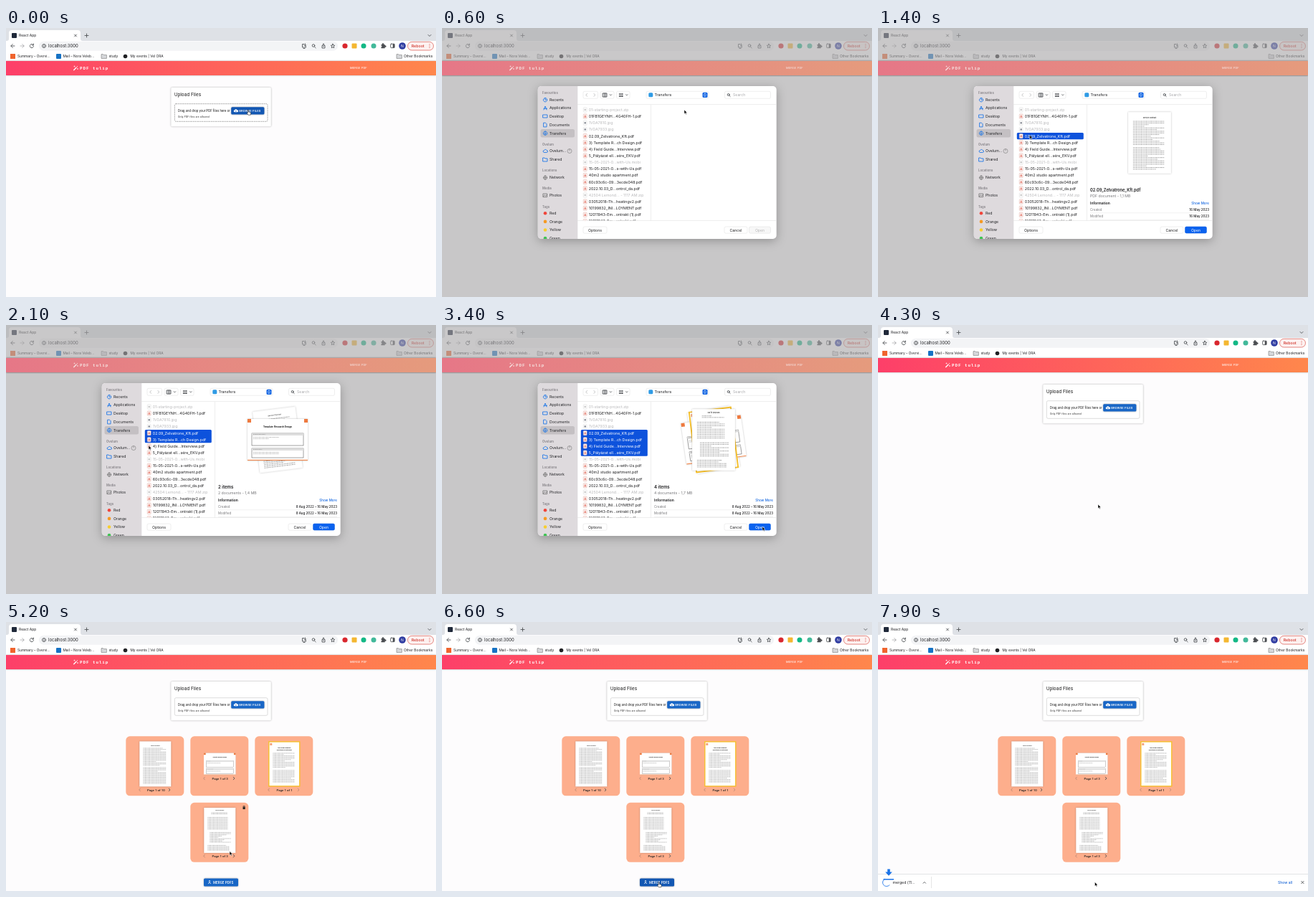
Animation, 600 px wide and 375 px high, one loop 8000 ms. Source, as an HTML page:

```html
<!DOCTYPE html>
<html lang="en">
<head>
<meta charset="utf-8">
<title>PDF merging demo</title>
<style>
html, body { margin: 0; width: 100%; height: 100%; overflow: hidden; background: #fdfcfd; }
svg { display: block; width: 100vw; height: 100vh; font-family: Inter, sans-serif; }
.page { font-family: Roboto, sans-serif; }
.line { fill: none; stroke: #4a4d51; stroke-width: .85; stroke-linecap: round; stroke-linejoin: round; }
.blue { stroke: #1673e8; }
.words { fill: none; stroke: #858585; stroke-width: .5; stroke-dasharray: 1.3 .4 .7 .3 1.9 .5; }
.paper { filter: drop-shadow(0 .4px .8px #0004); }
.raised { filter: drop-shadow(0 .7px 1px #0005); }
</style>
</head>
<body>
<svg id="stage" viewBox="0 0 600 375"></svg>
<script>
const LOOP = 8000;
const stage = document.getElementById('stage');

let seed = 7;
const rand = () => (seed = seed * 16807 % 2147483647) / 2147483647;
const text = (x, y, size, str, fill = '#202124', extra = '') =>
  `<text x="${x}" y="${y}" font-size="${size}" fill="${fill}" ${extra}>${str}</text>`;
const box = (x, y, w, h, fill, r = 0, extra = '') =>
  `<rect x="${x}" y="${y}" width="${w}" height="${h}" rx="${r}" fill="${fill}" ${extra}/>`;
const dot = (x, y, r, fill, extra = '') => `<circle cx="${x}" cy="${y}" r="${r}" fill="${fill}" ${extra}/>`;
const line = (d, extra = '') => `<path class="line" d="${d}" ${extra}/>`;
const group = (id, body, extra = '') => `<g id="${id}" ${extra}>${body}</g>`;
const spaced = em => ` letter-spacing="${em}em"`;
const bold = ' font-weight="600"', medium = ' font-weight="500"', end = ' text-anchor="end"', mid = ' text-anchor="middle"';

// Paper thumbnails, centred on their own origin
function words(x, y, w, n, pitch) {
  let d = '';
  for (let i = 0; i < n; i++) d += `M${x} ${y + i * pitch}h${(w * (rand() < .25 ? .35 + rand() * .5 : .95)).toFixed(1)}`;
  return `<path class="words" d="${d}"/>`;
}
const sheet = (w, h, extra = 'class="paper"') => box(-w / 2, -h / 2, w, h, '#fff', 0, extra);
const docs = [
  () => sheet(44, 63) + text(0, -25, 1.7, 'Service Contract', '#333', mid + bold) + words(-17, -22, 34, 15, 1.7) + words(-17, 5, 34, 14, 1.7),
  () => sheet(84, 58) + box(-42, -29, 5, 5, '#ee7a3f') + box(37, -29, 5, 5, '#ee7a3f') + box(-42, 27.8, 84, 1.2, '#f08a52') +
    text(0, -16.8, 3, 'Template: Research Design', '#111', mid + ' font-weight="700"') +
    [[-9, 17], [12, 13]].map(([y, h]) => box(-36, y, 72, h, '#fff', 0, 'stroke="#444" stroke-width=".5"') +
      box(-36, y, 72, 3, '#ddd') + words(-34, y + 1.5, 18, 1, 2) + words(-34, y + 5.5, 38, 2, 2)).join(''),
  () => sheet(43, 62, 'stroke="#f5bf2c" stroke-width="1.4"') + box(-20, -29, 3, 3, '#f3a078') +
    text(0, -22, 2, 'Field Guide Example', '#111', mid + ' font-weight="700"') +
    text(0, -19, 2, 'Questions for Interview', '#111', mid + ' font-weight="700"') +
    words(-16, -15, 32, 12, 1.8) + words(-16, 9, 32, 10, 1.8),
  () => sheet(44, 63) + text(0, -27, 1.5, 'Call for proposals', '#333', mid + bold) + words(-12, -24.5, 24, 2, 1.6) +
    words(-17, -18, 30, 10, 1.8) + words(-14, 3, 31, 9, 1.7) + words(-17, 21, 32, 5, 1.7)
];
const doc = (i, x, y, scale, angle = 0) =>
  `<g transform="translate(${x} ${y}) rotate(${angle}) scale(${scale})">${docs[i]()}</g>`;

// Browser window
const header = (from, to, ink, id) => `
  <linearGradient id="${id}"><stop stop-color="${from}"/><stop offset="1" stop-color="${to}"/></linearGradient>
  ${box(0, 46, 600, 20, `url(#${id})`, 0, 'class="raised"')}
  <path d="M94.3 59l4.2-4.2M99.3 54l.5-.5" stroke="${ink}" stroke-width="1.3"/>
  <path d="M95.5 52.5v2M94.5 53.5h2M100 56v2M99 57h2" stroke="${ink}" stroke-width=".6"/>
  ${text(103, 58, 5.9, 'PDF tulip', ink, `font-family="Liberation Mono, monospace" font-weight="700"${spaced(.16)}`)}
  ${text(480, 57.3, 4.2, 'MERGE PDF', ink, 'class="page"' + spaced(.03))}`;

const folder = x => `<path d="M${x} 36.6h2.6l.8 1h4v4.8h-7.4z" fill="#d7d9dc" stroke="#777" stroke-width=".6"/>`;

const chrome = `
  ${box(0, 0, 600, 18, '#dee1e6')}
  <path d="M1 18q3 0 3-3V7q0-4 4-4h92q4 0 4 4v8q0 3 3 3z" fill="#fff"/>
  ${box(8, 7, 7, 7, '#20293a', 1)}${text(18, 12.4, 5, 'React App')}
  ${line('M95.5 9l3 3m0-3l-3 3M110 10.5h5M112.5 8v5M589 9.5l2 2 2-2')}
  ${box(0, 18, 600, 28, '#fff')}${box(46, 18.7, 417, 13, '#f3f4f6', 6.5)}
  ${line('M12 25H7m2.3-2.5L6.8 25l2.5 2.5')}
  ${line('M20 25h5m-2.3-2.5l2.5 2.5-2.5 2.5', 'opacity=".45"')}
  ${line('M38 23.5a2.6 2.6 0 1 0 .5 2M38.4 22v2h-2')}
  ${dot(53, 25, 2.5, 'none', 'class="line"')}${line('M53 24.8v1.5M53 23.6v.1')}
  ${text(59, 27.2, 5.9, 'localhost:3000')}
  ${line('M416 22.5h-2.5v4.5h5v-1.2M417.5 22v3m-1.3-1.2l1.3 1.3 1.3-1.3M415 28.5h2')}
  ${dot(429, 24.5, 1.8, 'none', 'class="line"')}${line('M430.4 26l1.8 1.8')}
  ${line('M441.8 24.5h-.8v3.5h4v-3.5h-.8M443 26v-4m-1.2 1.2l1.2-1.2 1.2 1.2')}
  ${line('M456 22.2l.8 1.9 2 .2-1.5 1.4.4 2-1.7-1-1.7 1 .4-2-1.5-1.4 2-.2z')}
  ${dot(473, 25, 3.6, '#d9272e')}${box(482.5, 21.5, 7, 7, '#f4b731', 1)}
  ${dot(499, 25, 3.5, '#13b885')}${dot(513, 25, 3.5, '#42b99a')}
  <path d="M523.5 23h1.5a1.2 1.2 0 1 1 2 0h1.7v1.6a1.2 1.2 0 1 1 0 2v1.6h-5.2v-1.6a1 1 0 1 0 0-2z" fill="#4a4d51"/>
  ${box(536.7, 22.2, 5.4, 5.4, 'none', .7, 'class="line"')}${box(539.7, 22.2, 2.4, 5.4, '#4a4d51')}
  ${dot(553, 25, 4.8, '#2e3ba1')}${text(553, 26.8, 5, 'N', '#fff', mid)}
  ${box(560.5, 19.3, 36, 11.7, '#fdf1f0', 5.8, 'stroke="#d9554c" stroke-width=".7"')}
  ${text(565.7, 27.1, 5.3, 'Reboot', '#cf3128', medium)}
  ${[22.8, 25, 27.2].map(y => dot(591, y, .55, '#cf3128')).join('')}
  ${box(6, 36, 7, 7, '#f0642e')}${text(16, 41.2, 4.8, 'Summary – Overvi...')}
  ${box(70, 36, 7, 7, '#1672c4', 1)}${text(79.5, 41.2, 4.8, 'Mail – Nora Veleb...')}
  ${folder(133)}${text(143.5, 41.2, 4.9, 'study')}
  ${dot(166.5, 39.5, 2.8, '#202124')}${text(173.5, 41.2, 4.8, 'My events | Vel ORA')}
  ${folder(545)}${text(555, 41.2, 4.9, 'Other Bookmarks')}`;

// Web page
const upload = `
  ${box(230.3, 83, 139.5, 54.3, '#fff', 1.5, 'class="raised"')}
  ${text(235, 94.5, 6.7, 'Upload Files', '#222', spaced(.0075))}
  ${box(235.3, 105.7, 129.7, 24.6, 'none', 2, 'id="zone" stroke-width=".6"')}
  ${text(240, 116.8, 4.45, 'Drag and drop your PDF files here or', '#222', spaced(.0094))}
  ${text(240, 125, 3.55, 'Only PDF files are allowed', '#333', spaced(.033))}
  ${box(314.2, 110.2, 46.2, 10.3, '#1866c6', 1.5, 'id="browse" class="raised"')}
  <path d="M319 117.3a1.4 1.4 0 0 1 .1-2.8 1.8 1.8 0 0 1 3.3-.2 1.5 1.5 0 0 1 .3 3z" fill="#fff"/>
  <path d="M320.8 117v-1.8m-.8.8l.8-.8.8.8" fill="none" stroke="#1866c6" stroke-width=".5"/>
  ${text(325.2, 116.9, 4.25, 'BROWSE FILES', '#fff', medium + spaced(.028))}`;

function card(i, x, y, scale, pageY, pages) {
  const cx = x + 40.5, next = pages > 1 ? 1 : .35;
  return box(x, y, 81, 83, '#fdae8c', 5.5) + doc(i, cx + .5, y + 38.6, scale) +
    text(cx + (pages > 9 ? 1.5 : .8), pageY, 4.4, `Page 1 of ${pages}`, '#222', mid + medium) +
    line(`M${cx - 20.5} ${pageY - 3.3}l-1.6 1.8 1.6 1.8`, 'opacity=".4"') +
    line(`M${cx + 19.5} ${pageY - 3.3}l1.6 1.8-1.6 1.8`, `opacity="${next}"`);
}
const cards = card(0, 167.3, 159.3, 1, 235.5, 10) + card(1, 257.3, 159.3, .53, 219.5, 3) +
  card(2, 347.3, 159.3, 1, 235.5, 1) + card(3, 257.3, 251.8, 1, 327.7, 3) +
  group('trash', '<path d="M330.3 256.8h3.6v.8h-3.6zM331.3 256.2h1.6v.6h-1.6zM330.5 258h3.2v3.1h-3.2z" fill="#222"/>') +
  box(276, 357.5, 48, 11, '#1866c6', 1.5, 'id="merge" class="raised"') +
  '<path d="M284 360.3v2.2l-1.7 2.5m1.7-2.5l1.7 2.5m-2.7-3.7l1-1 1 1" fill="none" stroke="#fff" stroke-width=".8"/>' +
  text(289, 364.7, 4.5, 'MERGE PDFS', '#fff', medium + spaced(.028));

// File dialog
const files = ['01-starting-project.zip', '01FB1GEYNH...4G40FH-1.pdf', '1V0A7810.jpg', '1V0A7933.jpg',
  '02.09_Zelvatrone_Kft.pdf', '3) Template R...ch Design.pdf', '4) Field Guide...Interview.pdf', '5_Pályázat ell...sére_EKV.pdf',
  '15-05-2021-0...with-Us.mobi', '15-05-2021-0...s-with-Us.pdf', '40m2 studio apartment.pdf', '60c93c6c-09...3ecde048.pdf',
  '2022.10.03_D...ontrol_da.pdf', '42504 Lemond... - 1117 AM.zip', '03052018-Th...heatingv2.pdf',
  '10199832_INI...LOYMENT.pdf', '12011943-Em...ontrakt (1).pdf', '12011943-Em...ontrakt.pdf'];
const pitch = 9.15;
function fileRow(i, ink) {
  const y = 114 + i * pitch, pdf = files[i].endsWith('pdf');
  const icon = box(197.3, y - 3.1, 4.8, 6.2, '#fff', .8, `stroke="${pdf ? '#e3aca2' : '#ddd'}" stroke-width=".6"`) +
    (pdf ? `<path d="M198.6 ${y + 1.6}l1.1-3.2 1.2 3.2m-2.1-.5h2" fill="none" stroke="#dd5a48" stroke-width=".7"/>`
         : box(198.5, y - 1.2, 2.4, 2.4, files[i].endsWith('jpg') ? '#8b8f98' : '#ccc'));
  return icon + text(204.8, (y + 1.9).toFixed(2), 5.3, files[i], ink || (pdf ? '#1d1d1f' : '#b9b9bb'));
}

const sizes = ['1,1 MB', '1,4 MB', '1,6 MB', '1,7 MB'];
const tilt = [0, -7, -8, -10];
function selection(n) {
  const top = 114 + 4 * pitch - pitch / 2;
  let s = box(193.8, top, 93, n * pitch, '#0d52dc', 1.5);
  for (let i = 0; i < n; i++) s += fileRow(4 + i, '#fff');
  for (let i = 0; i < n; i++) s += doc(i, 379, 160, i === 1 ? 1 : 1.36, tilt[n - 1 - i]);
  s += n > 1 ? text(296, 227.5, 6.1, `${n} items`, '#1d1d1f', bold) : text(296, 227.5, 5.7, files[4], '#1d1d1f', bold);
  s += text(296, 235.7, 5.2, `${n > 1 ? n + ' documents' : 'PDF document'} - ${sizes[n - 1]}`, '#77777a');
  s += text(296, 245.7, 5, 'Information', '#1d1d1f', bold) + text(462, 245.7, 4.6, 'Show More', '#1467e0', end + medium);
  ['Created', 'Modified'].forEach((label, i) => {
    const y = 254.7 + i * 9.6;
    s += text(296, y, 4.4, label, '#77777a') +
      text(462, y, 4.5, n > 1 ? '8 Aug 2022 – 16 May 2023' : '16 May 2023', '#1d1d1f', end + medium) +
      box(296, y + 3, 166, .4, '#dcdcdc');
  });
  return group('sel' + n, s);
}

const side = [['Recents', 100], ['Applications', 111.5], ['Desktop', 123.2], ['Documents', 135], ['Transfers', 146.7],
  ['Ovelum...', 171.5], ['Shared', 183.2], ['Network', 208.5], ['Photos', 233.3]];
const heads = [['Favourites', 90.5], ['Ovelum', 162], ['Locations', 198.7], ['Media', 223.8], ['Tags', 249]];
const tags = [['Red', '#f0453b'], ['Orange', '#f59a23'], ['Yellow', '#f7ce2f'], ['Green', '#3fc452']];
const glyphs = ['M144 97.5a2.7 2.7 0 1 0 .1 0M144 98.5v1.8h1.3', 'M142 114l2-5 2 5m-4-1.7h4.5', 'M141 121h6v4h-6z',
  'M142 132.2h2.5l1.5 1.5v4.2h-4z', 'M144 144a2.7 2.7 0 1 0 .1 0M144 145.2v3m-1.1-1.1l1.1 1.1 1.1-1.1',
  'M142.5 173.5a1.5 1.5 0 0 1 .2-3 1.8 1.8 0 0 1 3.3 0 1.5 1.5 0 0 1 0 3z', 'M141 181h2l1 1h3v4h-6z',
  'M144 206a2.6 2.6 0 1 0 .1 0m-2.6 2.6h5.1M144 206v5.2', 'M141.3 231h5.4v4.6h-5.4zm0 3.5l2-1.5 1.5 1 1.9-1.5'];
const gray = 'style="stroke:#777"';
const sidebar = box(133.7, 81, 55.6, 213, '#dedadd') + box(137.5, 141, 47.5, 11.6, '#c4c0c3', 2.5) +
  heads.map(([s, y]) => text(140, y + 1.6, 4.3, s, '#858287', bold)).join('') +
  side.map(([s, y], i) => text(150, y + 1.9, 5.2, s) +
    `<path class="line blue" d="${glyphs[i]}" ${i > 6 ? gray : ''}/>`).join('') +
  dot(178, 171.5, 3, 'none', 'stroke="#777" stroke-width=".6"') + '<path d="M178 171.5v-3" stroke="#777" stroke-width=".6"/>' +
  tags.map(([s, c], i) => dot(144, 258.3 + i * 11.6, 2.3, c) + text(150, 260.2 + i * 11.6, 5.2, s)).join('');

const pill = (x, y, w, h, fill = '#fff') => box(x, y, w, h, fill, 2, 'stroke="#ddd" stroke-width=".5"');
const dialog = `
  <clipPath id="frame">${box(133.7, 81, 333, 213, '#fff', 5)}</clipPath>
  <clipPath id="listArea">${box(189, 107, 278, 161.3, '#fff')}</clipPath>
  ${box(133.7, 81, 333, 213, '#fff', 5, 'style="filter:drop-shadow(0 3px 7px #0004)"')}
  <g clip-path="url(#frame)">${sidebar}
    ${box(189, 106.3, 278, .5, '#ddd')}${box(189, 268.3, 278, .5, '#ddd')}${box(291.2, 107, .5, 161.5, '#ddd')}
    <g clip-path="url(#listArea)">${files.map((f, i) => fileRow(i)).join('')}${[1, 2, 3, 4].map(selection).join('')}</g>
  </g>
  ${pill(197, 88.3, 20.5, 10)}${line('M202.5 91.5l-1.6 1.9 1.6 1.9M212 91.5l1.6 1.9-1.6 1.9', 'opacity=".4"')}
  ${pill(221, 88.3, 19, 10)}${line('M224.5 91h5.5v5h-5.5zM226.3 91v5M228.2 91v5M234.2 92.8l1.2 1.2 1.2-1.2')}
  ${pill(243.5, 88.3, 18.5, 10)}<path d="M247 92.2h5.6M247 95h5.6" stroke="#4a4d51" stroke-width="1.8" stroke-dasharray="1.5 .5"/>${line('M256.5 92.8l1.2 1.2 1.2-1.2')}
  ${pill(285, 88.3, 87, 10)}${box(288.3, 90.3, 6, 6, '#2f9be5', 1.5)}
  ${text(296.5, 95.3, 5.3, 'Transfers')}
  ${box(363.5, 89.7, 7, 7.2, '#1668e3', 1.5)}${line('M365.8 92.5l1.2-1.2 1.2 1.2M365.8 94.2l1.2 1.2 1.2-1.2', 'style="stroke:#fff"')}
  ${pill(394.5, 88.3, 64, 10)}${dot(399.7, 93, 1.5, 'none', 'class="line"')}${line('M400.9 94.2l1.3 1.3')}
  ${text(406, 95.3, 5.2, 'Search', '#a9a9ac')}
  ${pill(197, 277, 33, 9.2)}${text(213.5, 283.5, 5.2, 'Options', '#1d1d1f', mid)}
  ${pill(394, 277, 32, 9.2)}${text(410, 283.5, 5.2, 'Cancel', '#1d1d1f', mid)}
  ${pill(428.5, 277, 30, 9.2, '#f7f7f7')}${text(443.5, 283.5, 5.2, 'Open', '#b5b5b7', mid)}
  ${group('open', box(428.3, 276.8, 30.4, 9.5, '#0b62ee', 2, 'id="openBox"') + text(443.5, 283.5, 5.2, 'Open', '#fff', mid))}`;

// The inactive window: darkened, with its toolbar washed out
const dimmed = box(0, 0, 600, 375, '#000', 0, 'opacity=".21"') +
  box(0, 0, 600, 46, '#c9c7c9', 0, 'opacity=".52"') + header('#e67787', '#e59b7d', '#f6e4e2', 'pale');

// Download shelf
const shelf = `
  ${box(0, 351.5, 600, 30, '#fff')}${box(0, 351.2, 600, .6, '#d2d4d7')}
  ${line('M16 366.8a5.5 5.5 0 1 1-6.8-8.5', 'id="spin" style="stroke:#1a73e8"')}
  ${text(20.5, 365.3, 5.2, 'merged (11...')}${line('M63 364.2l1.8-1.8 1.8 1.8')}${box(74, 355, .5, 16, '#ccc')}
  ${text(558, 364.9, 5, 'Show all', '#1a66d6', medium)}${line('M590.7 361.3l3.4 3.4m0-3.4l-3.4 3.4')}`;
const arrow = '<path d="M13.2 -4.5h3.6v4h3L15 4.7 10.2 -.5h3z" fill="#1a73e8"/>';

stage.innerHTML = box(0, 0, 600, 375, '#fdfcfd') + chrome + header('#fd3f69', '#ff874c', '#fff', 'warm') +
  `<g class="page">${upload}${group('cards', cards)}</g>` + group('shelf', shelf) +
  group('drop', box(7.5, 358, 14.5, 1.5, '#1a73e8') + group('arrow', arrow)) +
  group('modal', dimmed + dialog) +
  group('pointer', group('tip', '<path d="M0 0v5.7l1.3-1.2.9 2.1 1-.4-.9-2h1.8z" fill="#000" stroke="#fff" stroke-width=".5"/>') +
    group('hand', '<path d="M-.6 .4q.6-.7 1.2 0v2.5l2.5.6q.8.3.6 1.2l-.5 2.5h-3.2l-2-2.6q0-1 1.4-.2z" fill="#fff" stroke="#000" stroke-width=".5"/>'));

const el = {};
stage.querySelectorAll('[id]').forEach(node => el[node.id] = node);
const show = (id, on) => el[id].style.display = on ? '' : 'none';
const ramp = (t, from, to) => Math.min(1, Math.max(0, (t - from) / (to - from)));
const ease = k => k * k * (3 - 2 * k);

// Pointer stops: time, x, y
const path = [[0, 338, 114], [800, 338, 114], [1350, 212, 149], [1700, 203, 151], [1900, 200, 159], [2100, 199, 168],
  [2600, 200, 177], [2800, 215, 183], [3250, 447, 281], [3700, 447, 281], [4200, 307, 250], [4700, 307, 250],
  [5150, 312, 319.5], [5300, 312, 319.5], [5800, 302.5, 362.5], [8000, 302.5, 362.5]];
function pointer(t) {
  const i = path.findIndex(p => p[0] > t), a = path[i - 1], b = path[i], k = ease(ramp(t, a[0], b[0]));
  return [a[1] + (b[1] - a[1]) * k, a[2] + (b[2] - a[2]) * k];
}

function draw(t) {
  const [x, y] = pointer(t);
  const start = t < 300, onMerge = t >= 5650 && t < 7400;
  el.pointer.setAttribute('transform', `translate(${x} ${y})`);
  show('hand', start || onMerge);
  show('tip', !start && !onMerge);
  el.zone.setAttribute('stroke', start ? '#555' : '#c4c4c4');
  el.zone.setAttribute('stroke-dasharray', start ? '1.5 1' : 'none');
  el.browse.setAttribute('fill', start ? '#1257b3' : '#1866c6');

  const modal = ramp(t, 250, 400) * (1 - ramp(t, 3680, 3850));
  show('modal', modal > 0);
  el.modal.style.opacity = modal;
  const picked = [1400, 1900, 2250, 2600].filter(at => t >= at).length;
  for (let n = 1; n <= 4; n++) show('sel' + n, n === picked);
  show('open', picked > 0);
  el.openBox.setAttribute('fill', t > 3500 ? '#0c54c4' : '#0b62ee');

  show('cards', t >= 4650);
  show('trash', x > 257 && x < 338 && y > 252 && y < 334);
  el.merge.setAttribute('fill', onMerge ? '#1257b3' : '#1866c6');

  show('shelf', t >= 7400);
  el.shelf.setAttribute('transform', `translate(0 ${24 * (1 - ease(ramp(t, 7400, 7600)))})`);
  show('drop', t >= 7600);
  el.arrow.setAttribute('transform', `translate(0 ${330 + 19 * ease(ramp(t, 7600, 7900))})`);
  el.spin.setAttribute('transform', `rotate(${(t - 7900) * .3} 12 363)`);
}

const begin = performance.now();
function tick() {
  draw((performance.now() - begin) % LOOP);
  requestAnimationFrame(tick);
}
tick();
</script>
</body>
</html>
```
